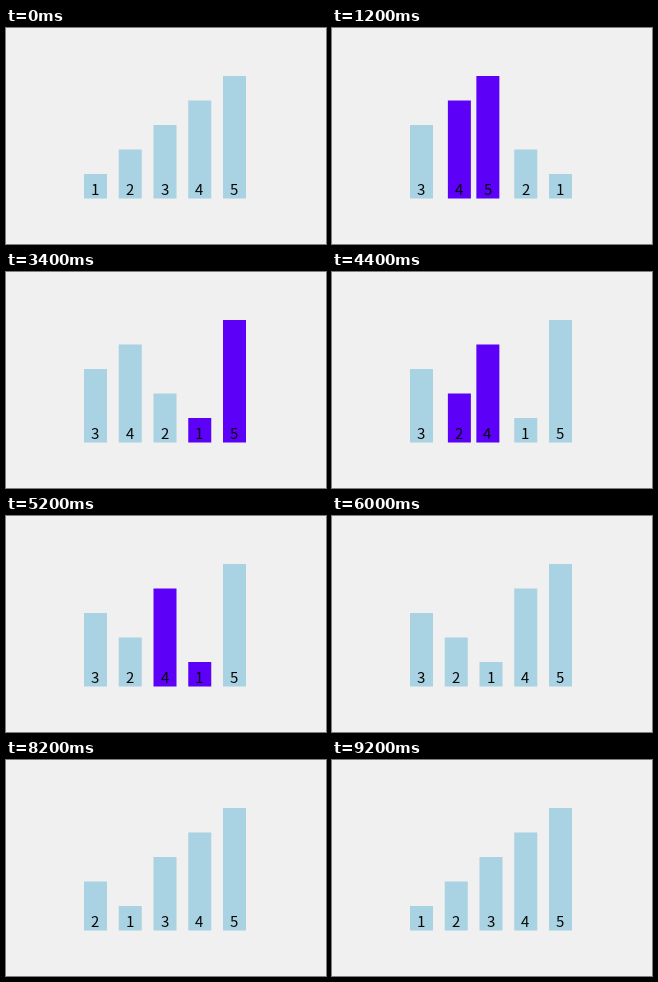
Write a matplotlib script that moves like this. It is 320 px wide and 216 px high and loops after 10000 ms.

```python
import matplotlib.pyplot as plt
from matplotlib.animation import FuncAnimation
from matplotlib.colors import to_rgb
from matplotlib.patches import Rectangle

W, H, DPI = 320, 216, 100
STEP = 200
LOOP = 10000
LEFT, PITCH, WIDTH = 78, 34.75, 23
FLOOR, UNIT, BASELINE = 170.5, 24.5, 167
BACK, IDLE, ACTIVE = "#f0f0f0", "#a9d2e2", "#5c00f8"
START = [3, 5, 4, 2, 1]

# One swap: (share of the way travelled, strength of the highlight)
SWAP = [(0, 1), (0.91, 1), (1, 1), (1, 0.5), (1, 0)]


def mix(a, b, t):
    return tuple(p + (q - p) * t for p, q in zip(to_rgb(a), to_rgb(b)))


def still(values):
    return {v: (i, 0) for i, v in enumerate(values)}


def bubble_sort(values):
    """List the pictures of the sort; each maps value -> (slot, highlight)."""
    values = list(values)
    out = [still(values)] * 2
    for end in range(len(values) - 1, 0, -1):
        for i in range(end):
            a, b = values[i], values[i + 1]
            rest = still(values)
            if a < b:
                out.append({**rest, a: (i, 1), b: (i + 1, 1)})
                continue
            for move, glow in SWAP:
                out.append({**rest, a: (i + move, glow), b: (i + 1 - move, glow)})
            values[i], values[i + 1] = b, a
        if end == 3:
            pause_after = len(out) + len(SWAP)
    out.insert(pause_after, out[pause_after - 1])
    return out


count = LOOP // STEP
done = still(sorted(START))
pictures = [done] * 2 + bubble_sort(START)
pictures += [done] * (count - len(pictures))

fig = plt.figure(figsize=(W / DPI, H / DPI), dpi=DPI, facecolor=BACK)
ax = fig.add_axes([0, 0, 1, 1])
ax.set_xlim(0, W)
ax.set_ylim(H, 0)
ax.axis("off")

bars, labels = {}, {}
for v in sorted(START):
    bars[v] = ax.add_patch(
        Rectangle((0, FLOOR - v * UNIT), WIDTH, v * UNIT, lw=0, snap=False))
    labels[v] = ax.text(0, BASELINE, str(v), ha="center", va="baseline",
                        family="Noto Sans CJK JP", size=15 * 72 / DPI, color="#080808")


def draw(n):
    for v, (slot, glow) in pictures[n].items():
        x = LEFT + PITCH * slot
        bars[v].set_x(x)
        bars[v].set_facecolor(mix(IDLE, ACTIVE, glow))
        labels[v].set_x(x + WIDTH / 2 - 0.5)
    return [*bars.values(), *labels.values()]


anim = FuncAnimation(fig, draw, frames=count, interval=STEP, repeat=True,
                     repeat_delay=0, blit=False)
plt.show()
```
